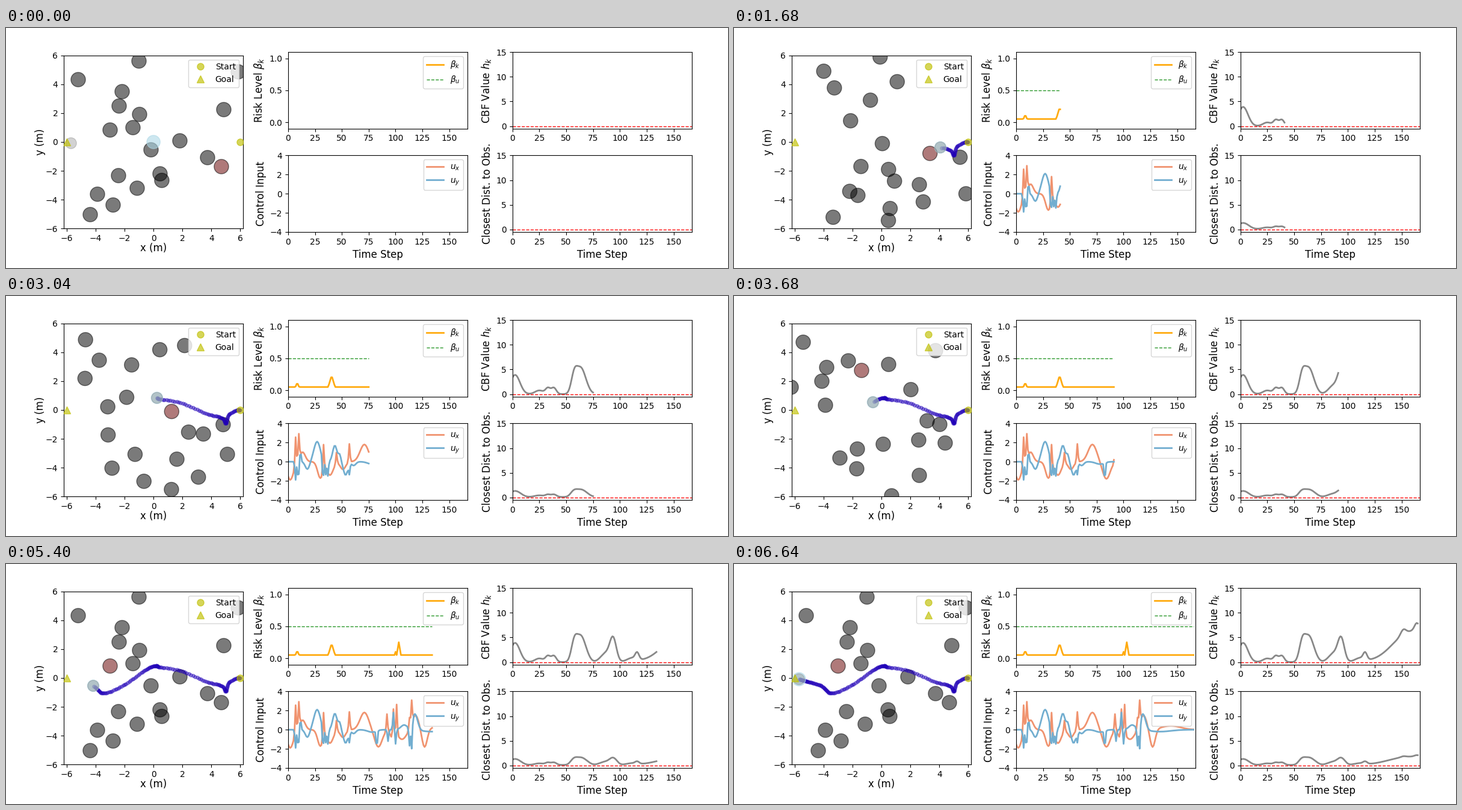
Animation of 1200x400 px, one loop 7.08 s. Source, as a matplotlib script:

```python
import numpy as np
import matplotlib.pyplot as plt
from matplotlib.animation import FuncAnimation
from matplotlib.patches import Circle

plt.rcParams["font.family"] = "DejaVu Sans"

LAST = 166          # final simulation step
HOLD = 11           # ticks spent on the final step
STEPS = np.arange(LAST + 1)
SCALE = 24.06       # stage pixels per metre
GRAY, RED = (0, 0, 0, .52), (.4, 0, 0, .52)


def smooth(t, values):
    """Cubic Hermite curve through (t, values), sampled at every step."""
    t, v = np.asarray(t, float), np.asarray(values, float)
    slope = np.gradient(v, t)
    i = np.clip(np.searchsorted(t, STEPS, side="right") - 1, 0, len(t) - 2)
    h = t[i + 1] - t[i]
    s = (STEPS - t[i]) / h
    return ((1 + 2 * s) * (1 - s) ** 2 * v[i] + s * (1 - s) ** 2 * h * slope[i]
            + s * s * (3 - 2 * s) * v[i + 1] + s * s * (s - 1) * h * slope[i + 1])


def path(*keys):
    """Positions in metres along (step, x pixel, y pixel) keys."""
    t, x, y = zip(*keys)
    return np.column_stack([(smooth(t, x) - 245.15) / SCALE,
                            (190 - smooth(t, y)) / SCALE])


def patrol(home, first, second):
    """Leave home, pass two stops, return and rest."""
    return path((0, *home), (60, *first), (92, *second), (135, *home), (LAST, *home))


def bumps(*terms):
    """Sum of bell curves, each (centre, height, width)."""
    return sum(a * np.exp(-.5 * ((STEPS - c) / w) ** 2) for c, a, w in terms)


def spikes(*terms):
    return bumps(*((c, a, .6) for c, a in terms))


def tent(centre, height, half):
    return height * np.clip(1 - abs(STEPS - centre) / half, 0, 1)


obstacles = np.stack([
    patrol((120, 86), (149, 70), (115, 77)),
    patrol((221, 55), (250, 59), (257, 114)),
    patrol((335, 216), (378, 215), (342, 214)),
    patrol((362, 136), (264, 80), (335, 91)),
    patrol((193, 106), (227, 121), (190, 108)),
    patrol((188, 130), (160, 97), (154, 119)),
    patrol((187, 246), (177, 135), (95, 152)),
    patrol((386, 73), (211, 205), (212, 124)),
    patrol((241, 203), (340, 216), (307, 240)),
    patrol((256, 243), (279, 249), (321, 208)),
    patrol((222, 144), (315, 283), (248, 247)),
    patrol((152, 277), (217, 275), (205, 255)),
    patrol((289, 188), (257, 231), (294, 156)),
    patrol((358, 231), (385, 280), (351, 245)),
    patrol((211, 166), (199, 228), (146, 142)),
    patrol((140, 311), (172, 308), (176, 270)),
    patrol((173, 170), (189, 277), (152, 182)),
    patrol((178, 295), (277, 308), (262, 333)),
    patrol((218, 267), (255, 326), (204, 288)),
    patrol((259, 254), (325, 299), (308, 299)),
], axis=1)

robot = path(
    (0, 389, 190), (8, 384, 190), (16, 371, 197), (26, 365, 212), (32, 361, 205),
    (46, 333, 196), (60, 287, 177), (70, 256, 172), (79, 249, 169.5), (92, 231, 177),
    (106, 197, 201), (120, 163, 215.5), (135, 145, 203), (150, 122, 196), (LAST, 108, 192))

risk = (.05 + tent(8.5, .07, 1.7) + tent(40.5, .18, 3.2)
        + tent(100, .05, 1) + tent(103, .2, 2))
risk_limit = np.full(LAST + 1, .5)

u_x = bumps((2, -1.9, 3), (13.5, 1, 2.5), (30, -1.7, 2.5), (39, -1.4, 3), (51, -.8, 2.5),
            (71, 1.8, 4), (84, -1.8, 3.5), (97, -.8, 2), (106, -1, 4), (118.5, 1.5, 3),
            (127, -1.9, 2.4), (144, .4, 9))
u_x += spikes((7, 3), (10, 2.6), (33, 2.8), (45, 1.2), (57, 1.9), (92, 1.8),
              (98, 3), (101, 3.2), (113, 1.2), (115, 2.4))

u_y = bumps((18, -.8, 2), (27, 2.1, 3), (43.5, 1.7, 2), (48, .7, 1.2), (53.5, -1.4, 2),
            (61, -.4, 2), (78, -.25, 4), (108, .5, 3), (118, 1.7, 2.5), (134, -.2, 10))
u_y += spikes((7, -1.9), (9.5, -1.9), (11.5, 1.1), (32.5, -2.4), (35, -1.4), (37, -1.5),
              (57, -1), (82.5, -1.8), (93, -1.2), (98, 1.8), (100, -1.5),
              (113, -2), (115, -2.8))

# Distance margin to the nearest obstacle: a late rise plus separate encounters.
barrier = 7 / (1 + np.exp((141 - STEPS) / 8)) + bumps(
    (2.5, 3.9, 4.5), (25, .75, 4), (33, 1.2, 2.2), (38.5, 1.3, 2.3), (57.5, 3.7, 2.8),
    (63.8, 5.1, 4), (70, .6, 3), (87, 1.8, 4.8), (93.7, 4.5, 3), (111, .7, 4.5),
    (116, 1.4, 1.8), (151.5, 1.1, 2.5), (164, 1.3, 2))
clearance = np.sqrt(1 + barrier) - .88

fig = plt.figure(figsize=(12, 4), dpi=100)
grid = fig.add_gridspec(2, 3, left=.08, right=.95, bottom=.15, top=.9,
                        wspace=.25, hspace=.35)

arena = fig.add_subplot(grid[:, 0])
arena.set(xlim=(-6.2, 6.2), ylim=(-6, 6), aspect="equal",
          xticks=range(-6, 7, 2), yticks=range(-6, 7, 2))
arena.set_xlabel("x (m)", fontsize=12, labelpad=0)
arena.set_ylabel("y (m)", fontsize=12, labelpad=0)
mark = dict(color="y", ms=8, alpha=.65, ls="none", zorder=4)
arena.plot([6], [0], marker="o", label="Start", **mark)
arena.plot([-6], [0], marker="^", label="Goal", **mark)
trail, = arena.plot([], [], "o", color="#2000b8", ms=4, mew=.8, alpha=.45)
crowd = arena.scatter(*obstacles[0].T, s=300, linewidths=1)
halo = arena.add_patch(Circle((0, 0), .46, color="lightblue", alpha=.6, zorder=3))
body = arena.add_patch(Circle((0, 0), .38, color="gray", alpha=.35, zorder=3))
arena.legend(loc="upper right")


def panel(row, col, label, ylim, yticks):
    ax = fig.add_subplot(grid[row, col])
    ax.set(xlim=(0, 167), ylim=ylim, xticks=range(0, 151, 25), yticks=yticks)
    ax.set_ylabel(label, fontsize=12)
    if row == 1:
        ax.set_xlabel("Time Step", fontsize=12)
    return ax


histories = []


def history(ax, data, color, **style):
    line, = ax.plot([], [], color=color, **{"lw": 2, **style})
    histories.append((line, data))


ax = panel(0, 1, r"Risk Level $\beta_k$", (-.1, 1.1), (0, .5, 1))
history(ax, risk, "#ffab10", label=r"$\beta_k$")
history(ax, risk_limit, "#2a982a", label=r"$\beta_u$", lw=1, ls="--")
ax.legend(loc="upper right")

ax = panel(1, 1, "Control Input", (-4, 4), range(-4, 5, 2))
history(ax, u_x, "#f0936f", label=r"$u_x$")
history(ax, u_y, "#72aed0", label=r"$u_y$")
ax.legend(loc="upper right")

for row, label, data in ((0, r"CBF Value $h_k$", barrier),
                         (1, "Closest Dist. to Obs.", clearance)):
    ax = panel(row, 2, label, (-.5, 15), (0, 5, 10, 15))
    history(ax, data, "#888888")
    ax.axhline(0, color="red", lw=1, ls="--")


def update(tick):
    step = min(tick, LAST)
    for line, data in histories:
        line.set_data(STEPS[:step], data[:step])
    trail.set_data(*robot[:step].T)
    crowd.set_offsets(obstacles[step])
    nearest = np.argmin(np.hypot(*(obstacles[step] - robot[step]).T))
    crowd.set_facecolor([RED if i == nearest else GRAY
                         for i in range(obstacles.shape[1])])
    crowd.set_edgecolor(GRAY)
    # Before the run starts the halo waits at the centre, the body at the goal.
    body.center = tuple(robot[step if step else LAST])
    halo.center = tuple(robot[step]) if step else (0, 0)
    halo.set_radius(.4 if 0 < step < LAST else .46)
    return [line for line, _ in histories] + [trail, crowd, halo, body]


anim = FuncAnimation(fig, update, frames=LAST + HOLD, interval=40,
                     repeat=True, repeat_delay=0)
plt.show()
```
